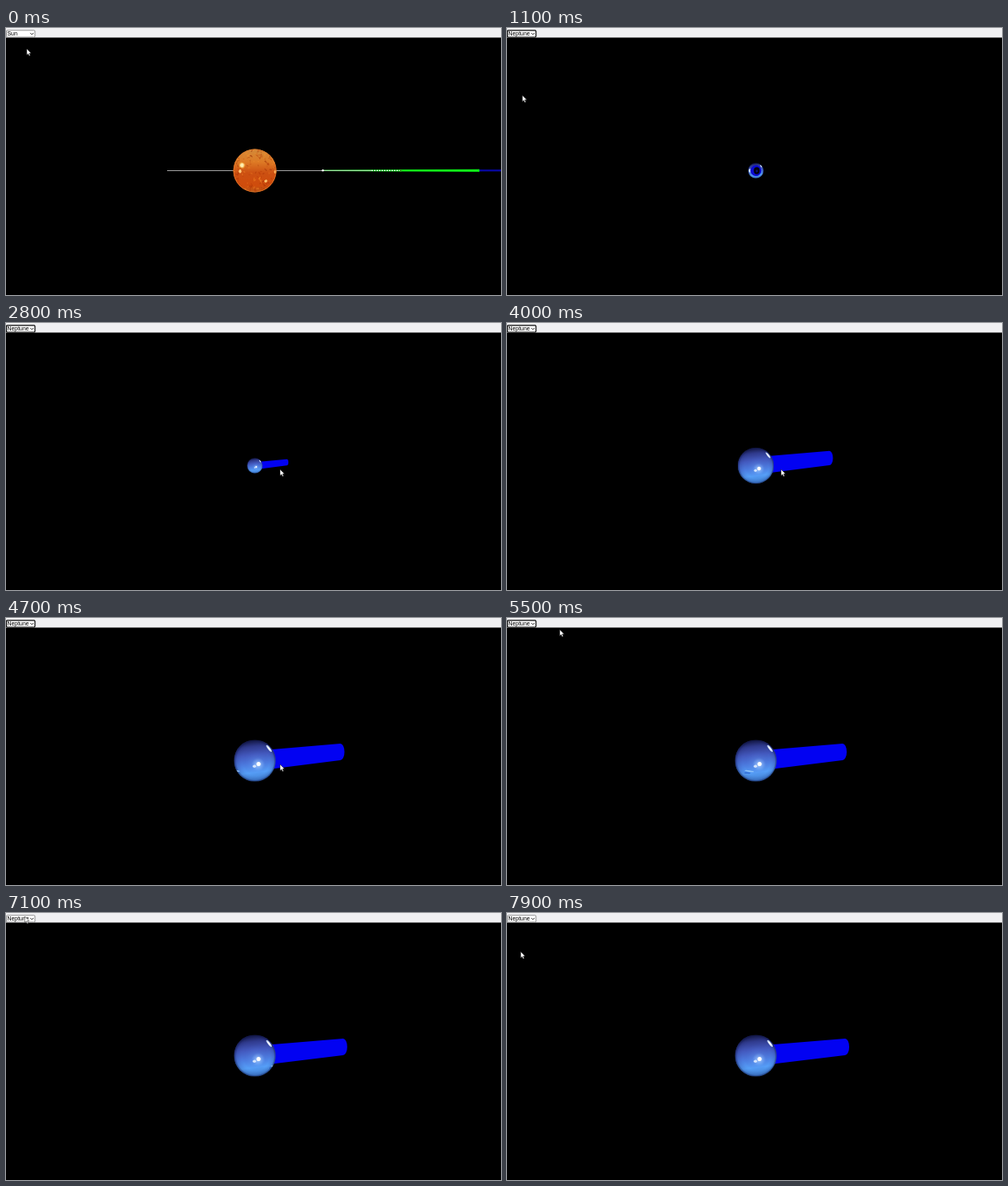
Animation, 596 px wide and 321 px high, one loop 8 s. Source, as an HTML page with a canvas:

```html
<!DOCTYPE html>
<html lang="en">
<head>
<meta charset="utf-8">
<title>Planet viewer</title>
<style>
  html, body { margin: 0; width: 100%; height: 100%; overflow: hidden; background: #000; }
  canvas { display: block; }
</style>
</head>
<body>
<canvas id="stage" width="596" height="321"></canvas>
<script>
const ctx = document.getElementById('stage').getContext('2d');
const LOOP = 8000, STEP = 100;
const CX = 299.6, CY = 171.5, SUN_R = 26;

// Tracks: [time, value, ...]
const pointer = [
  [0, 25, 25], [300, 19, 6], [450, 18, 6], [800, 18, 80], [1100, 18.5, 81],
  [1800, 255, 165], [2500, 338, 174], [2700, 330, 176], [5000, 330, 176],
  [5300, 195, 78], [5400, 127, 37], [5500, 63.5, 14], [5700, 34, 6],
  [6400, 27, 5], [7200, 22, 4], [7900, 16.5, 46.5]
];
const radius = [[0, 9.3], [2800, 9.3], [3600, 15.5], [4000, 21.7], [4500, 24.6], [4700, 25.1]];
const reach = [[0, 4.36], [3600, 4.34], [4000, 4.28], [4700, 4.3], [5500, 4.36], [6400, 4.39], [7900, 4.48]];
const swing = [[1800, 0], [2500, 1]];

function track(keys, t) {
  if (t <= keys[0][0]) return keys[0].slice(1);
  for (let i = 1; i < keys.length; i++) {
    const a = keys[i - 1], b = keys[i];
    if (t <= b[0]) {
      const p = (t - a[0]) / (b[0] - a[0]);
      return a.slice(1).map((v, j) => v + (b[j + 1] - v) * p);
    }
  }
  return keys[keys.length - 1].slice(1);
}

function rng(seed) {
  return () => (seed = (seed * 16807) % 2147483647) / 2147483647;
}

function ellipse(x, y, rx, ry, fill, angle = 0) {
  ctx.beginPath();
  ctx.ellipse(x, y, rx, ry, angle, 0, Math.PI * 2);
  ctx.fillStyle = fill;
  ctx.fill();
}

function gradient(g, stops) {
  stops.forEach(([at, color]) => g.addColorStop(at, color));
  return g;
}

function line(x1, x2, y, width, color, dash = []) {
  ctx.beginPath();
  ctx.setLineDash(dash);
  ctx.moveTo(x1, y);
  ctx.lineTo(x2, y);
  ctx.lineWidth = width;
  ctx.strokeStyle = color;
  ctx.stroke();
  ctx.setLineDash([]);
}

const rand = rng(4711);
const spotColors = ['rgba(150,40,0,.4)', 'rgba(175,50,0,.4)', 'rgba(255,150,45,.35)'];
const spots = Array.from({ length: 420 }, () => ({
  lon: rand() * Math.PI * 2,
  lat: Math.asin(rand() * 2 - 1),
  size: 0.8 + rand() * 1.5,
  tilt: rand() * 3,
  color: spotColors[Math.floor(rand() * 3)]
}));

function drawOrbits(t) {
  line(194, 381, 171.5, 1, '#a0a0a0');
  ctx.fillStyle = '#00d810';
  ctx.beginPath();
  ctx.moveTo(381, 170.7);
  ctx.lineTo(570, 169.8);
  ctx.lineTo(570, 172.9);
  ctx.lineTo(381, 172.1);
  ctx.fill();
  line(475, 570, 171.3, 1.6, '#18f01c');
  line(570, 596, 171.3, 2.2, '#0808a8');
  line(381, 440, 171.3, 1, '#c8f0c8');
  ctx.lineDashOffset = -t / 200;
  line(440, 475, 171.3, 1.2, '#e8ffe8', [2, 1]);
  ctx.lineDashOffset = 0;
  ellipse(381.5, 171.3, 1.3, 1.3, '#fff');
  ellipse(475.3, 171.3, 1.3, 1.5, '#30a020');
}

function drawSun(t) {
  ctx.save();
  ctx.beginPath();
  ctx.arc(CX, CY, SUN_R, 0, Math.PI * 2);
  ctx.clip();
  ctx.fillStyle = gradient(ctx.createLinearGradient(0, CY - SUN_R, 0, CY + SUN_R), [
    [0, '#d28a3a'], [0.3, '#dd7a25'], [0.55, '#cc5012'], [0.85, '#cf4c0c'], [1, '#b85818']
  ]);
  ctx.fillRect(CX - 27, CY - 27, 54, 54);
  const patch = (lon, lat, rx, ry, color, tilt) => {
    const a = lon + t * 0.00012, depth = Math.cos(a);
    if (depth < 0) return;
    ellipse(CX + SUN_R * Math.cos(lat) * Math.sin(a), CY + SUN_R * Math.sin(lat),
      rx * (0.3 + 0.7 * depth), ry, color, tilt);
  };
  spots.forEach(s => patch(s.lon, s.lat, s.size, s.size * 0.4, s.color, s.tilt));
  patch(-0.66, -0.25, 4.2, 3.4, 'rgba(255,205,90,.6)', 0.4);
  patch(-0.66, -0.25, 2.6, 2.4, '#ffedb0', 0.4);
  patch(-0.75, 0.03, 2, 2.2, '#ffc878', 0);
  patch(0.62, 0.5, 2.2, 1.5, '#ffc56d', -0.6);
  patch(1.25, 0.06, 3, 2, '#ffb45a', 0);
  ctx.restore();
  ctx.beginPath();
  ctx.arc(CX, CY, SUN_R - 0.5, 0, Math.PI * 2);
  ctx.lineWidth = 1;
  ctx.strokeStyle = 'rgba(225,125,45,.7)';
  ctx.stroke();
}

function drawGlobe(r, t) {
  ctx.save();
  ctx.translate(CX, CY);
  ctx.scale(r, r);
  ctx.beginPath();
  ctx.arc(0, 0, 1, 0, Math.PI * 2);
  ctx.clip();
  ctx.fillStyle = gradient(ctx.createLinearGradient(-0.12, -1, 0.12, 1), [
    [0, '#15173f'], [0.16, '#303a8c'], [0.36, '#4359be'], [0.58, '#4c7ce0'], [0.78, '#56a0f8'], [1, '#3c78c8']
  ]);
  ctx.fillRect(-1, -1, 2, 2);
  ctx.fillStyle = gradient(ctx.createRadialGradient(0.12, 0.2, 0.1, 0, 0, 1), [
    [0, 'rgba(130,180,255,.3)'], [0.6, 'rgba(60,90,200,0)'], [0.88, 'rgba(15,25,90,.15)'], [1, 'rgba(8,14,60,.65)']
  ]);
  ctx.fillRect(-1, -1, 2, 2);
  // cloud streak carried round by the spin
  const lon = -0.37 + (t - 5500) * 0.00106, depth = Math.cos(lon);
  if (depth > 0) {
    const x = 0.86 * Math.sin(lon);
    ellipse(x, 0.5, 0.24 * depth, 0.035, 'rgba(180,225,255,.6)', 0.15);
    ellipse(x - 0.1, 0.59, 0.17 * depth, 0.03, 'rgba(20,70,190,.55)', 0.1);
  }
  ellipse(0.68, -0.58, 0.2, 0.055, 'rgba(210,230,255,.9)', 0.9);
  ellipse(0.68, -0.58, 0.12, 0.03, '#fff', 0.9);
  ctx.fillStyle = gradient(ctx.createRadialGradient(0.16, 0.18, 0, 0.16, 0.18, 0.32), [
    [0, 'rgba(255,255,255,.75)'], [0.35, 'rgba(190,220,255,.4)'], [1, 'rgba(140,190,255,0)']
  ]);
  ctx.fillRect(-0.3, -0.3, 1, 1);
  ellipse(0.18, 0.16, 0.1, 0.1, '#fff');
  ellipse(-0.02, 0.27, 0.08, 0.07, 'rgba(230,240,255,.85)');
  ctx.restore();
}

function drawTube(r, t, turn) {
  const side = Math.sin(turn * Math.PI / 2);
  const face = Math.cos(turn * Math.PI / 2);
  const capX = (0.2 + 0.5 * face) * r, capY = (0.4 + 0.3 * face) * r;
  const x = CX + (track(reach, t)[0] - 0.2) * r * side;
  const y = CY - 0.42 * r * side;
  ctx.fillStyle = '#0202f2';
  ctx.beginPath();
  ctx.moveTo(CX, CY - 0.47 * r);
  ctx.lineTo(x, y - capY);
  ctx.ellipse(x, y, capX, capY, 0, -Math.PI / 2, Math.PI / 2);
  ctx.lineTo(CX, CY + 0.5 * r);
  ctx.fill();
  if (face > 0.05) {
    ellipse(x, y, capX, capY, '#0b0bd0');
    ellipse(x + 0.12 * r * face, y, 0.38 * r * face, 0.45 * r, '#02020c');
    ellipse(x + 0.12 * r * face, y + 0.05 * r, 0.13 * r * face, 0.16 * r, '#101070');
  }
}

function drawNeptune(t) {
  const [r] = track(radius, t), [turn] = track(swing, t);
  const behind = turn > 0.7;
  if (behind) drawTube(r, t, turn);
  drawGlobe(r, t);
  if (turn < 0.2) ellipse(CX - 0.78 * r, CY, 0.14 * r, 0.24 * r, 'rgba(220,235,255,.9)');
  if (!behind) drawTube(r, t, turn);
}

function drawMenu(label, focused) {
  ctx.fillStyle = '#f0f0f2';
  ctx.fillRect(0, 0, 596, 11.5);
  ctx.beginPath();
  ctx.roundRect(0.5, 2.8, 34.4, 8.2, 1.2);
  ctx.fillStyle = '#fff';
  ctx.fill();
  ctx.lineWidth = focused ? 1.2 : 0.8;
  ctx.strokeStyle = focused ? '#080808' : '#777';
  ctx.stroke();
  ctx.fillStyle = '#000';
  ctx.font = '6.9px "Liberation Sans", Arial, sans-serif';
  ctx.fillText(label, 1.5, 9.3);
  ctx.beginPath();
  ctx.moveTo(29.2, 5.9);
  ctx.lineTo(31.2, 7.9);
  ctx.lineTo(33.2, 5.9);
  ctx.lineWidth = 0.9;
  ctx.strokeStyle = '#222';
  ctx.stroke();
}

function drawPointer([x, y]) {
  ctx.save();
  ctx.translate(x, y);
  ctx.beginPath();
  ctx.moveTo(0, 0);
  [[0, 7.4], [1.7, 5.9], [2.9, 8.6], [4.2, 8], [3, 5.4], [5.2, 5.2]].forEach(p => ctx.lineTo(...p));
  ctx.closePath();
  ctx.fillStyle = '#fff';
  ctx.fill();
  ctx.lineWidth = 0.5;
  ctx.strokeStyle = '#222';
  ctx.stroke();
  ctx.restore();
}

function draw(t) {
  ctx.fillStyle = '#000';
  ctx.fillRect(0, 0, 596, 321);
  if (t < 1000) {
    drawOrbits(t);
    drawSun(t);
  } else {
    drawNeptune(t);
  }
  drawMenu(t < 850 ? 'Sun' : 'Neptune', t >= 400 && t < 6000);
  drawPointer(track(pointer, t));
}

function frame() {
  const t = performance.now() % LOOP;
  draw(Math.floor(t / STEP) * STEP);
  requestAnimationFrame(frame);
}
frame();
</script>
</body>
</html>
```
